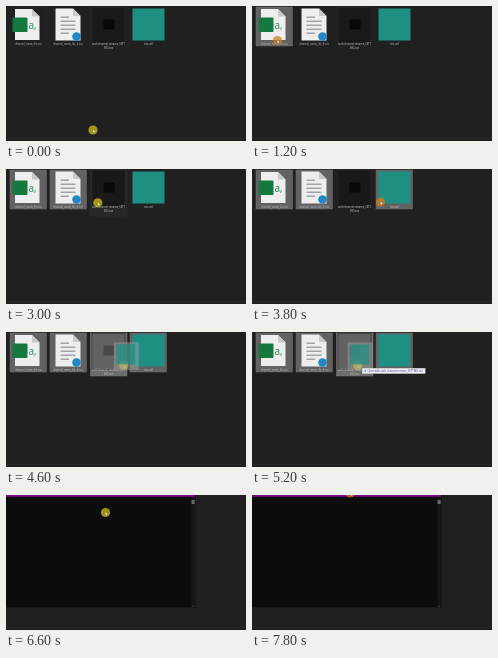
These frames come from a looping animation (240 px wide and 135 px high, 8 s). An HTML page:

```html
<!DOCTYPE html>
<html lang="en">
<head>
<meta charset="utf-8">
<title>Drag files onto a program</title>
<style>
html, body { margin: 0; width: 100%; height: 100%; overflow: hidden; background: #202020; }
svg { display: block; width: 100%; height: 100%; }
text { font-family: "Open Sans", "Noto Sans", sans-serif; font-size: 2.6px; fill: #c4c4c4; }
.mid { text-anchor: middle; }
</style>
</head>
<body>
<svg viewBox="0 0 240 135" preserveAspectRatio="none">
  <rect width="240" height="135" fill="#202020"/>
  <rect y="132" width="240" height="0.8" fill="#2b292a"/>

  <g id="cells"></g>

  <!-- spreadsheet file -->
  <path d="M9 3H26L33.5 10.5V34H9Z" fill="#eeeeee"/>
  <path d="M26 3V10.5H33.5Z" fill="#c9c9c9"/>
  <rect x="6.5" y="11.5" width="15" height="14.5" rx="1" fill="#14783f"/>
  <text x="22.5" y="22.5" style="font-size:10px;fill:#27945a">a,</text>

  <!-- text file -->
  <path d="M49.5 2.5H67L74.5 10V34.5H49.5Z" fill="#eeeeee"/>
  <path d="M67 2.5V10H74.5Z" fill="#c9c9c9"/>
  <path d="M54.5 11.3H63M54.5 15.3H69.5M54.5 19.3H69.5M54.5 23.3H69.5M54.5 27.3H63" stroke="#a2a4a8" stroke-width="1.5" fill="none"/>
  <circle cx="70.5" cy="30.5" r="4.3" fill="#2187c8"/>

  <!-- program -->
  <rect id="thumb" x="86" y="1.5" width="33" height="36" fill="#191919" stroke="#2b2b2b" stroke-width="0.6"/>
  <rect id="core" x="97.5" y="13.5" width="11" height="10" fill="#080808"/>

  <rect x="126.5" y="2.5" width="32" height="32" fill="#1f8f84"/>

  <g class="mid">
    <text x="22.5" y="38.7">channel_name_list.csv</text>
    <text x="62" y="38.7">channel_name_list_fr.tsx</text>
    <text x="102.5" y="38.7">auth-channel-rename_SETT</text>
    <text x="102.5" y="43">ING.exe</text>
    <text x="142.5" y="38.7">test.wtf</text>
  </g>

  <g id="console">
    <rect width="190" height="113" fill="#171717"/>
    <rect width="185.5" height="112" fill="#0c0c0c"/>
    <rect width="189" height="1.7" fill="#850a88"/>
    <rect x="185.5" y="5" width="3.2" height="4" fill="#686868"/>
    <path d="M186.2 110.7l1 1l1-1" fill="none" stroke="#777" stroke-width="0.4"/>
  </g>

  <g id="cursor">
    <circle id="halo" r="4.6"/>
    <path d="M0 -0.5V2.8L0.8 2.1L1.4 3.3L2 3L1.5 1.8H2.4Z" fill="#fff" stroke="#333" stroke-width="0.2"/>
  </g>

  <g id="ghost">
    <rect x="-10" y="-23" width="25" height="28" fill="#a4a4a4" opacity="0.45"/>
    <rect x="-7.5" y="-21" width="19" height="20" fill="#1f8f84" opacity="0.75"/>
  </g>

  <g id="tip">
    <rect x="4.5" y="2.8" width="63" height="5.4" fill="#f1eff5" stroke="#b9b4c4" stroke-width="0.3"/>
    <path d="M6 5.5H8.3M7.4 4.5L8.4 5.5L7.4 6.5" fill="none" stroke="#2f6fd0" stroke-width="0.6"/>
    <text x="9.7" y="6.4" style="fill:#4b4597">Open with auth-channel-rename_SETTING.exe</text>
  </g>
</svg>
<script>
const LOOP = 8000, STEP = 200;
const $ = id => document.getElementById(id);
const show = (id, on) => $(id).setAttribute('visibility', on ? 'visible' : 'hidden');
const place = (id, x, y) => $(id).setAttribute('transform', `translate(${x} ${y})`);
const within = (t, a, b) => t >= a && t < b;

// time, x, y of the pointer
const path = [
  [0, 87, 124], [1000, 26, 35], [1600, 24, 33], [1800, 24, 33],
  [2400, 52, 33], [2600, 57, 33], [3200, 104, 34], [3800, 128.5, 33],
  [4200, 129.5, 33], [5000, 106, 33.5], [5800, 104, 33],
  [6600, 99.5, 17.5], [7000, 99.3, 14], [7800, 98.3, -2]
];

function pointer(t) {
  let i = 0;
  while (i < path.length - 2 && t >= path[i + 1][0]) i++;
  const [a, x0, y0] = path[i], [b, x1, y1] = path[i + 1];
  const u = Math.min(1, (t - a) / (b - a)), k = u * u * (3 - 2 * u);
  return [x0 + (x1 - x0) * k, y0 + (y1 - y0) * k];
}

const cells = [4, 44, 84.5, 124].map(x => {
  const r = document.createElementNS('http://www.w3.org/2000/svg', 'rect');
  const size = { x, y: 1, width: 36.5, height: 39, 'stroke-width': 0.5 };
  for (const key in size) r.setAttribute(key, size[key]);
  $('cells').append(r);
  return r;
});

function paint(cell, fill, stroke) {
  cell.setAttribute('fill', fill);
  cell.setAttribute('stroke', stroke);
}

function draw(t) {
  const [x, y] = pointer(t);
  const drag = within(t, 4400, 5400);
  const over = drag && x < 121;
  const pressed = within(t, 1200, 1400) || within(t, 2600, 2800) ||
    within(t, 3800, 4400) || t >= 7600;
  const picked = [1200, 2400, Infinity, 3800];

  cells.forEach((cell, i) => {
    const left = +cell.getAttribute('x');
    const hover = y < 46 && x >= left && x < left + 37;
    if (within(t, picked[i], 5600)) paint(cell, '#626262', '#6e6e6e');
    else if (hover) paint(cell, drag ? '#6c6c6c' : '#272727', drag ? '#787878' : '#303030');
    else paint(cell, 'none', i ? 'none' : '#2b2b2b');
  });
  cells[2].setAttribute('height', drag ? 43 : 46);
  $('thumb').setAttribute('fill', over ? '#626262' : '#191919');
  $('core').setAttribute('fill', over ? '#484848' : '#080808');

  show('ghost', drag);
  place('ghost', x, y);
  show('tip', drag && x < 112);
  place('tip', x, y);
  show('console', t >= 6000);
  place('cursor', x, y);
  $('halo').setAttribute('fill', pressed ? 'rgba(214,122,28,.74)' : 'rgba(206,196,22,.74)');
}

function tick() {
  const t = performance.now() % LOOP;
  draw(Math.floor(t / STEP) * STEP);
  requestAnimationFrame(tick);
}
tick();
</script>
</body>
</html>
```
